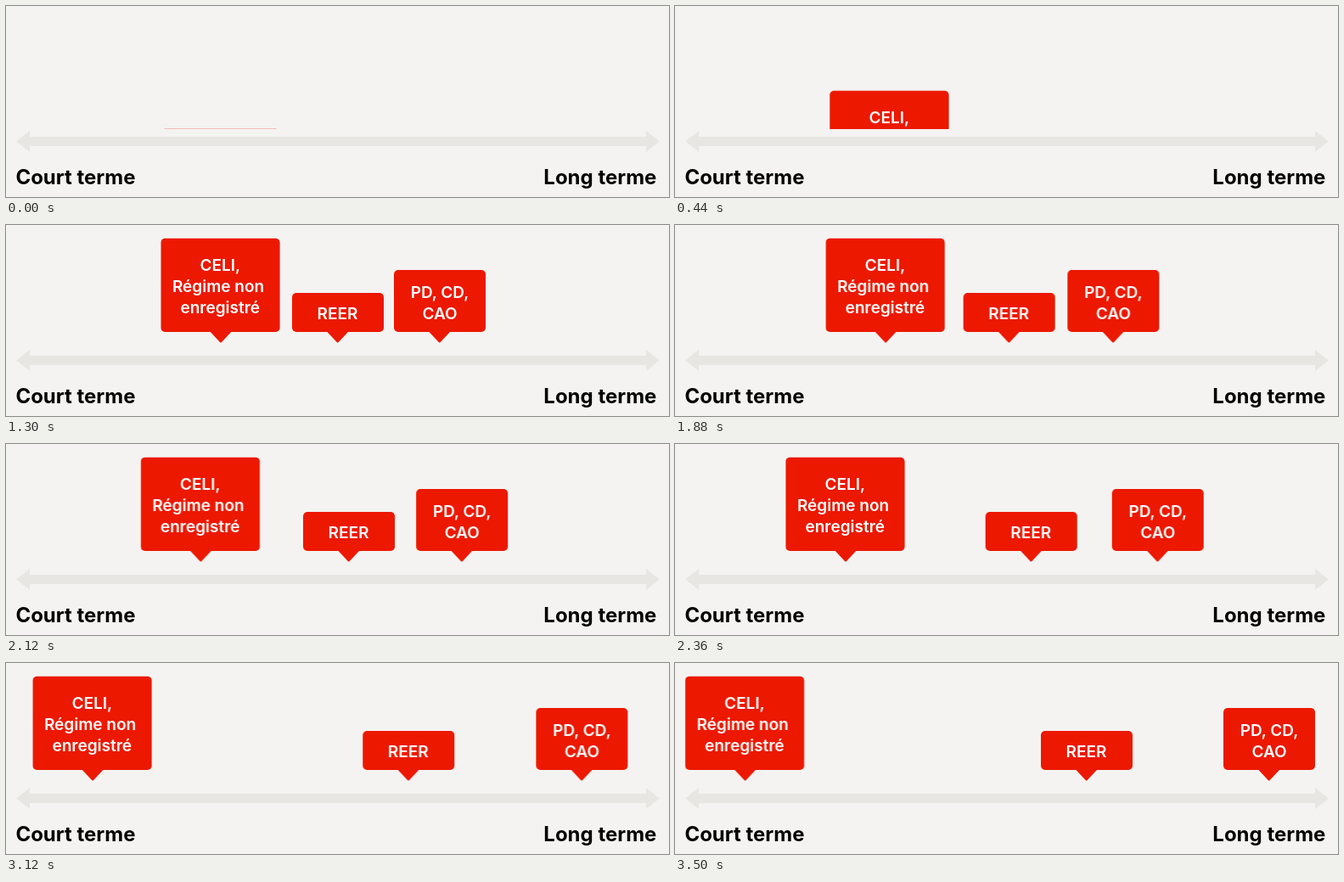
Write an HTML page that moves like this. It is 781 px wide and 225 px high and loops after 3.6 s.

```html
<!DOCTYPE html>
<html lang="fr">
<head>
<meta charset="utf-8">
<title>Court terme – Long terme</title>
<style>
  html, body { margin: 0; width: 100%; height: 100%; overflow: hidden; background: #f4f3f1; }
  svg { display: block; width: 781px; height: 225px; }
  text { font-family: Inter, "Open Sans", sans-serif; }
  .axis { fill: #e7e6e2; }
  .label { font-size: 24px; font-weight: 700; fill: #000; }
  .card { fill: #ec1800; }
  .card text { font-size: 19px; font-weight: 600; fill: #fff; text-anchor: middle; }

  .slide, .rise {
    animation: slide 3.6s infinite;
    animation-timing-function: cubic-bezier(.3333, 0, .6667, 1);
  }
  .rise { animation-name: var(--rise); }

  @keyframes slide {
    0%, 47.2222% { transform: translateX(0); }
    97.2222%, 100% { transform: translateX(var(--dx)); }
  }
  @keyframes rise-a {
    0%, 4.3056% { transform: translateY(129px); }
    24.3056%, 100% { transform: translateY(0); }
  }
  @keyframes rise-b {
    0%, 20.5556% { transform: translateY(65px); }
    31.6667%, 100% { transform: translateY(0); }
  }
  @keyframes rise-c {
    0%, 25% { transform: translateY(92px); }
    36.1111%, 100% { transform: translateY(0); }
  }
</style>
</head>
<body>
<svg viewBox="0 0 781 225">
  <defs>
    <clipPath id="above"><rect width="781" height="144.2"/></clipPath>
    <path id="tip" d="M-12.7 125.5H12.7L1 138Q0 139 -1 138Z"/>
  </defs>

  <path class="axis" d="M12 159.5L28 147V154H754V147L770 159.5L754 172V165H28V172Z"/>
  <text class="label" x="11.4" y="210">Court terme</text>
  <text class="label" x="766.4" y="210" text-anchor="end">Long terme</text>

  <g class="card" clip-path="url(#above)">
    <g transform="translate(182.3 0)">
      <g class="slide" style="--dx: -170.4px">
        <g class="rise" style="--rise: rise-a">
          <rect y="15.8" width="140.3" height="110.2" rx="5"/>
          <use href="#tip" x="70.7"/>
          <text x="70" y="54">CELI,</text>
          <text x="67.7" y="79">Régime non</text>
          <text x="70" y="104">enregistré</text>
        </g>
      </g>
    </g>
    <g transform="translate(337 0)">
      <g class="slide" style="--dx: 94px">
        <g class="rise" style="--rise: rise-b">
          <rect y="80" width="108" height="46" rx="5"/>
          <use href="#tip" x="53.7"/>
          <text x="53.5" y="111">REER</text>
        </g>
      </g>
    </g>
    <g transform="translate(457 0)">
      <g class="slide" style="--dx: 189px">
        <g class="rise" style="--rise: rise-c">
          <rect y="53" width="108" height="73" rx="5"/>
          <use href="#tip" x="53.7"/>
          <text x="54" y="86">PD, CD,</text>
          <text x="54" y="111">CAO</text>
        </g>
      </g>
    </g>
  </g>
</svg>
</body>
</html>
```
